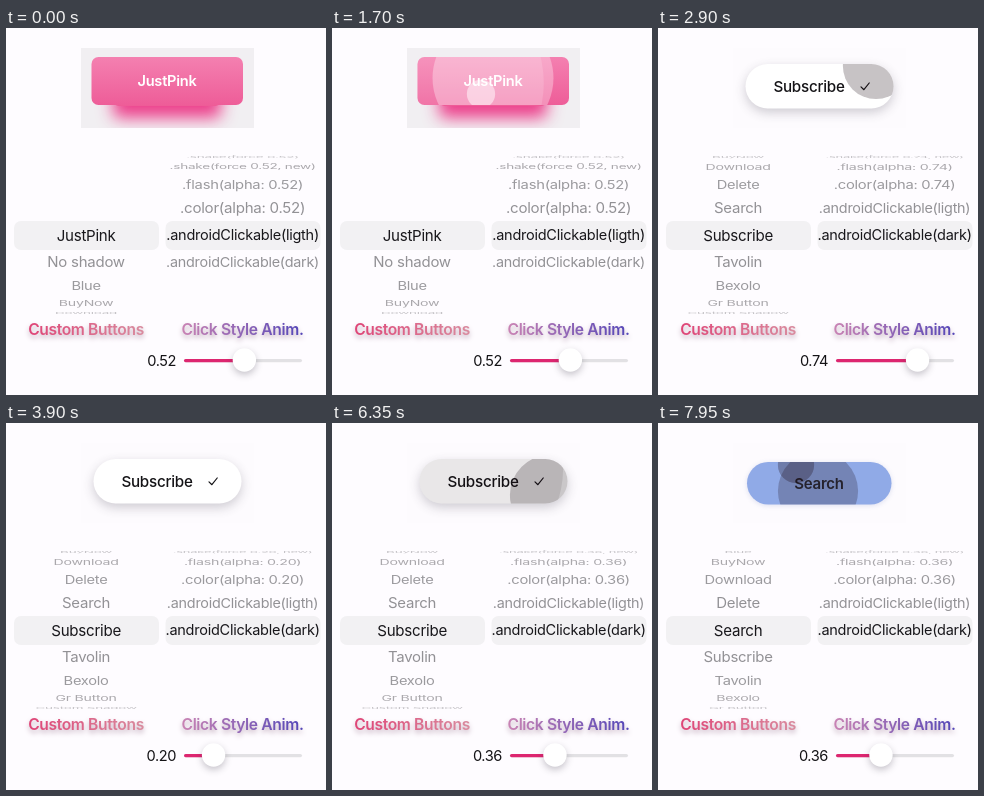
These frames come from a looping animation (320x367 px, 8 s). An HTML page with a canvas:

```html
<!DOCTYPE html>
<html lang="en">
<head>
<meta charset="utf-8">
<title>Button click styles</title>
<style>
html, body { margin: 0; width: 100%; height: 100%; overflow: hidden; background: #fefcff; }
canvas { display: block; width: 320px; height: 367px; }
</style>
</head>
<body>
<canvas id="stage"></canvas>
<script>
const W = 320, H = 367, LOOP = 8000;
const dpr = window.devicePixelRatio || 1;
const canvas = document.getElementById('stage');
canvas.width = W * dpr;
canvas.height = H * dpr;
const ctx = canvas.getContext('2d');

const FONT = 'Inter, Roboto, sans-serif';
const DARK = '#141316';
const BUTTONS = ['JustPink', 'No shadow', 'Blue', 'BuyNow', 'Download', 'Delete', 'Search',
  'Subscribe', 'Tavolin', 'Bexolo', 'Gr Button', 'Custom Shadow'];
const styleNames = v => [`.shake(force ${v})`, `.shake(force ${v}, new)`, `.flash(alpha: ${v})`,
  `.color(alpha: ${v})`, '.androidClickable(ligth)', '.androidClickable(dark)'];

// Taps follow a steady rhythm and cycle through the touch points;
// a touch with two points is a second finger landing LAG later.
const SPEED = 0.12, LIFE = 1200, LAG = 58;
const p = (x, y) => ({ x, y });
const SCENES = [
  { from: 0, button: 'JustPink', style: 4, value: 0.52, first: 39, gap: 386, ink: 0.55,
    touches: [[p(161, 53)], [p(86, 52), p(108, 60)], [p(105, 55)], [p(161, 50)], [p(149, 66)]] },
  { from: 2300, button: 'Subscribe', style: 5, value: 0.74, first: 325, gap: 500, ink: 0.31,
    touches: [[p(218, 38)], [p(140, 62)]] },
  { from: 3850, button: 'Subscribe', style: 5, value: 0.2, first: 375, gap: 500, ink: 0.16,
    touches: [[p(200, 58)], [p(166, 75), p(126, 45)]] },
  { from: 5500, button: 'Subscribe', style: 5, value: 0.36, first: 17, gap: 500, ink: 0.31,
    touches: [[p(131, 46)], [p(218, 72)]] },
  { from: 7200, button: 'Search', style: 5, value: 0.36, first: 417, gap: 183, ink: 0.32,
    touches: [[p(160, 68)], [p(138, 42)]] }
];

function pill(x, y, w, h, r, fill) {
  ctx.beginPath();
  ctx.roundRect(x, y, w, h, r);
  ctx.fillStyle = fill;
  ctx.fill();
}

function disc(x, y, r, fill) {
  ctx.beginPath();
  ctx.arc(x, y, r, 0, Math.PI * 2);
  ctx.fillStyle = fill;
  ctx.fill();
}

function withShadow(color, blur, dy, paint) {
  ctx.save();
  ctx.shadowColor = color;
  ctx.shadowBlur = blur * dpr;
  ctx.shadowOffsetY = dy * dpr;
  paint();
  ctx.restore();
}

function label(text, x, y, size, color, weight = 400, spacing = -0.25, align = 'center') {
  ctx.font = `${weight} ${size}px ${FONT}`;
  ctx.letterSpacing = spacing + 'px';
  ctx.textAlign = align;
  ctx.textBaseline = 'alphabetic';
  ctx.fillStyle = color;
  ctx.fillText(text, x, y + size * 0.36);
}

function gradient(x0, y0, x1, y1, a, b) {
  const g = ctx.createLinearGradient(x0, y0, x1, y1);
  g.addColorStop(0, a);
  g.addColorStop(1, b);
  return g;
}

// Rows sit on a cylinder, 20 degrees apart
function wheel(items, selected, x, w, size) {
  pill(x, 193, w, 29, 7, '#f2f1f3');
  items.forEach((text, i) => {
    const angle = (i - selected) * Math.PI / 9;
    const depth = Math.cos(angle);
    if (Math.abs(i - selected) > 4) return;
    const alpha = i === selected ? 1 : 0.08 + 0.4 * Math.sqrt(depth);
    ctx.save();
    ctx.translate(x + w / 2 - 0.4, 207.2 + 79 * Math.sin(angle));
    ctx.scale(0.87 + 0.13 * depth, depth);
    label(text, 0, 0, text.length > 20 ? size - 0.7 : size, `rgba(24,23,27,${alpha})`);
    ctx.restore();
  });
}

function ripples(scene, t, rgb) {
  const { first, gap, touches, ink } = scene;
  for (let i = 0, start = scene.from + first; start < t; i++, start += gap) {
    touches[i % touches.length].forEach((point, finger) => {
      const age = t - start - finger * LAG;
      if (age <= 0 || age >= LIFE) return;
      disc(point.x, point.y, age * SPEED, `rgba(${rgb},${ink * (1 - age / LIFE)})`);
    });
  }
}

function pinkButton(area) {
  withShadow('rgba(236,40,125,0.88)', 16, 12, () => pill(107, 44, 108, 34, 6, '#ee5c97'));
  pill(...area, gradient(0, 29, 0, 77, '#f480b0', '#ee5d98'));
  label('JustPink', 161, 53, 14.6, '#fff', 600);
}

function subscribeButton(area) {
  withShadow('rgba(60,55,70,0.24)', 11, 4, () => pill(...area, '#fff'));
  label('Subscribe', 151, 58.5, 15.2, DARK, 500);
  ctx.beginPath();
  ctx.moveTo(203, 58.9);
  ctx.lineTo(205.9, 61.7);
  ctx.lineTo(211.2, 55);
  ctx.strokeStyle = DARK;
  ctx.lineWidth = 1.2;
  ctx.lineCap = ctx.lineJoin = 'round';
  ctx.stroke();
}

function searchButton(area) {
  withShadow('rgba(90,110,180,0.2)', 5, 1, () => pill(...area, '#90aae7'));
  label('Search', 161, 60.5, 15, '#2a2b36', 600);
}

const KINDS = {
  JustPink: { draw: pinkButton, area: [85.5, 29, 151.5, 48, 7], back: '#f1eff2' },
  Subscribe: { draw: subscribeButton, area: [87.5, 36, 148, 44.5, 22.2], back: '#fdfbfe' },
  Search: { draw: searchButton, area: [89, 39, 144.5, 42.5, 21.2], back: '#fdfbfe' }
};

function preview(scene, t) {
  const { draw, area, back } = KINDS[scene.button];
  ctx.save();
  ctx.beginPath();
  ctx.rect(75, 20, 173, 80);
  ctx.clip();
  ctx.fillStyle = back;
  ctx.fillRect(75, 20, 173, 80);
  draw(area);
  ctx.beginPath();
  ctx.roundRect(...area);
  ctx.clip();
  ripples(scene, t, scene.style === 4 ? '255,255,255' : '22,5,14');
  ctx.restore();
}

function heading(text, x, w, a, b) {
  withShadow('rgba(110,60,95,0.4)', 5, 3, () =>
    label(text, x + w / 2, 301, 15.6, gradient(x, 0, x + w, 0, a, b), 600, -0.35));
}

function slider(value) {
  const x = 188.3 + 96.3 * value;
  label(value.toFixed(2), 170, 332.5, 14.6, DARK, 400, -0.4, 'right');
  pill(178, 331, 118, 3.2, 1.6, '#e2e1e4');
  pill(178, 331, x - 178, 3.2, 1.6, '#dd2670');
  withShadow('rgba(40,35,50,0.26)', 7, 3, () => disc(x, 332, 11.7, '#fff'));
}

function draw(t) {
  const scene = SCENES.findLast(s => s.from <= t);
  ctx.setTransform(dpr, 0, 0, dpr, 0, 0);
  ctx.fillStyle = '#fefcff';
  ctx.fillRect(0, 0, W, H);
  preview(scene, t);
  wheel(BUTTONS, BUTTONS.indexOf(scene.button), 8, 145, 15.1);
  wheel(styleNames(scene.value.toFixed(2)), scene.style, 159.5, 155, 15.2);
  heading('Custom Buttons', 22, 116, '#df4577', '#d98c9f');
  heading('Click Style Anim.', 176, 121, '#c983b4', '#5446b8');
  slider(scene.value);
}

function frame() {
  draw(performance.now() % LOOP);
  requestAnimationFrame(frame);
}
draw(0);
requestAnimationFrame(frame);
</script>
</body>
</html>
```
